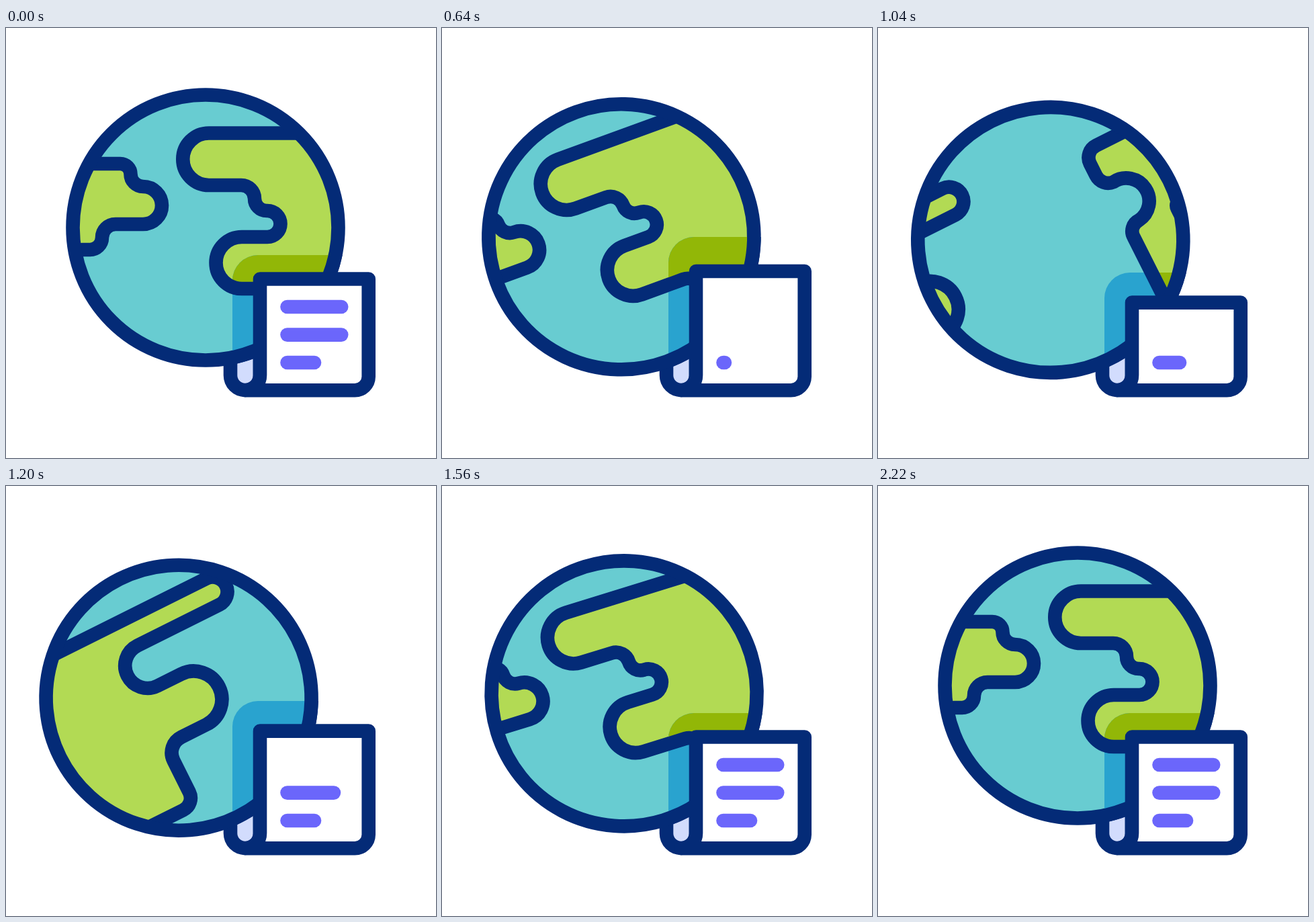
An HTML page with a canvas that plays this animation: 640 px wide and 640 px high, repeating every 2.4 s.

```html
<!DOCTYPE html>
<html lang="en">
<head>
<meta charset="utf-8">
<title>Globe and news</title>
<style>
  html, body { margin: 0; width: 100%; height: 100%; overflow: hidden; background: #fff; }
  canvas { display: block; }
</style>
</head>
<body>
<canvas id="stage" width="640" height="640"></canvas>
<script>
const ctx = document.getElementById('stage').getContext('2d');
const LOOP = 2400, TAU = Math.PI * 2;
const NAVY = '#042b77', BAR = '#6b66fb', FLAP = '#d2dcfd';
const LIGHT = { sea: '#68ccd1', land: '#b2da54' };
const SHADE = { sea: '#29a3cf', land: '#92b707' };
const MAP_WIDTH = 1040, RADIUS = 197.5, LINE = 20.6;

// Coastlines, relative to the globe's centre
const continents = new Path2D(
  `M5-140.5A38.75 38.75 0 0 0 5-63H53A20 20 0 0 1 73-43A18 18 0 0 0 91-25H92
   A19.5 19.5 0 0 1 92 14H54A38.5 38.5 0 0 0 54 91H119.5A20 20 0 0 1 139.5 111V132.5
   A20 20 0 0 0 159.5 152.5H363.5A20 20 0 0 0 383.5 132.5V80A26 26 0 0 1 409.5 54H451
   A42 42 0 0 0 451-30H412A33.5 33.5 0 0 1 412-97H548A21.75 21.75 0 0 0 548-140.5Z
   M-259-95H-127A15.5 15.5 0 0 1-111.5-79.5A18.5 18.5 0 0 0-93-61A28 28 0 0 1-93-5H-134
   A20 20 0 0 0-154 15A18 18 0 0 1-173 33H-183A10 10 0 0 0-193 43V150
   A38.5 38.5 0 0 1-270 150V52A18 18 0 0 1-252 33A34 34 0 0 0-260-35
   A20 20 0 0 1-279-55V-75A20 20 0 0 1-259-95Z`);

const progress = (t, from, to) => Math.min(1, Math.max(0, (t - from) / (to - from)));
const sine = p => (1 - Math.cos(Math.PI * p)) / 2;
const cubic = p => p < .5 ? 4 * p ** 3 : 1 - 4 * (1 - p) ** 3;
const back = (p, s) => (s + 1) * p ** 3 - s * p * p;

// Drops by `depth` with anticipation, then springs back past its rest
const dip = (t, start, low, end, depth, sIn, sOut) => depth * (t < low
  ? back(progress(t, start, low), sIn)
  : back(1 - progress(t, low, end), sOut));

function stroke(path, color = NAVY) {
  ctx.strokeStyle = color;
  ctx.stroke(path);
}

function fill(path, color) {
  ctx.fillStyle = color;
  ctx.fill(path);
}

function drawGlobe(tilt, scroll, colors) {
  const disc = new Path2D();
  disc.arc(0, 0, RADIUS, 0, TAU);
  ctx.save();
  ctx.translate(297 - 40.2 * tilt, 297 + 18.4 * tilt);
  ctx.rotate(-26.7 * tilt * Math.PI / 180);
  fill(disc, colors.sea);
  ctx.save();
  ctx.clip(disc);
  ctx.translate(scroll, 0);
  for (let copy = 0; copy < 2; copy++) {
    fill(continents, colors.land);
    stroke(continents);
    ctx.translate(-MAP_WIDTH, 0);
  }
  ctx.restore();
  stroke(disc);
  ctx.restore();
}

function drawFlap() {
  const flap = new Path2D('M334 486V517A22 22 0 0 0 378 517V486');
  fill(flap, FLAP);
  stroke(flap);
}

function drawPage(top) {
  const page = new Path2D(`M356 539.3A22 22 0 0 0 378 517V${top}H539.7V519A20.5 20.5 0 0 1 519 539.3Z`);
  fill(page, '#fff');
  stroke(page);
}

function drawBar(t, y, length, hideAt, showAt) {
  const shown = t < 800 ? 1 - sine(progress(t, hideAt, hideAt + 167))
                        : sine(progress(t, showAt, showAt + 160));
  if (shown > 0) stroke(new Path2D(`M418.5 ${y}h${length * shown + .01}`), BAR);
}

function draw(t) {
  const tilt = cubic(progress(t, 20, 1050)) - cubic(progress(t, 1072, 2168));
  const scroll = 1148 * sine(progress(t, 465, 1735)) - 108 * sine(progress(t, 20, 465));
  // Whole pixels keep the shadow's top edge free of a seam
  const shadowTop = Math.round(338 + dip(t, 270, 884, 1550, 150, 2.79, 2));

  ctx.fillStyle = '#fff';
  ctx.fillRect(0, 0, 640, 640);
  ctx.lineWidth = LINE;
  ctx.lineCap = ctx.lineJoin = 'round';

  drawFlap();
  drawGlobe(tilt, scroll, LIGHT);
  ctx.save();
  ctx.beginPath();
  ctx.roundRect(337, shadowTop, 300, 400, 38);
  ctx.clip();
  drawGlobe(tilt, scroll, SHADE);
  ctx.restore();

  drawPage(373.5 + dip(t, 380, 904, 1556, 130, 1.7, 1.7));
  drawBar(t, 415, 80.7, 167, 1228);
  drawBar(t, 456.6, 80.7, 333, 1080);
  drawBar(t, 498, 40.5, 500, 934);
}

const begin = performance.now();
function tick() {
  draw((performance.now() - begin) % LOOP);
  requestAnimationFrame(tick);
}
tick();
</script>
</body>
</html>
```
